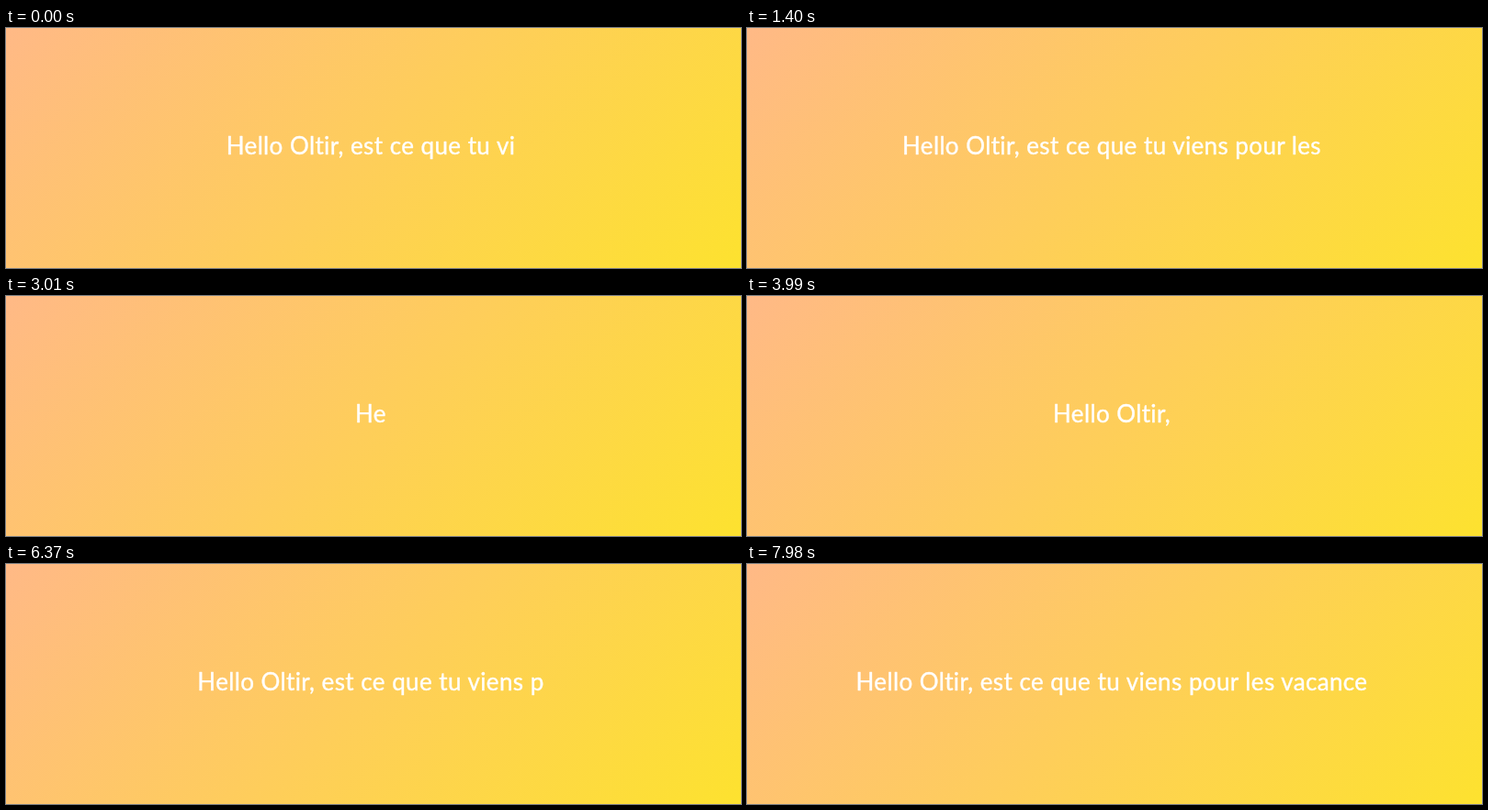
An HTML page that plays this animation: 800 by 262 pixels, repeating every 8000 ms.

```html
<!DOCTYPE html>
<html lang="fr">
<head>
<meta charset="utf-8">
<title>Typing greeting</title>
<style>
  html, body { margin: 0; width: 100%; height: 100%; overflow: hidden; }
  body { background: linear-gradient(135deg, #ffb986, #fde22f); }
  svg { display: block; width: 100%; height: 100%; }
  text {
    font: 26px Lato, "Open Sans", sans-serif;
    letter-spacing: .35px;
    word-spacing: .3px;
    text-anchor: middle;
    fill: #fff;
    stroke: #fff;
    stroke-width: .4px;
    stroke-linejoin: round;
  }
</style>
</head>
<body>
<svg viewBox="0 0 800 262"><text id="line" x="397" y="138"></text></svg>
<script>
  const LOOP = 8000;
  const STEP = 70;         // display interval
  const RESTART = 2730;    // moment the line is cleared
  const CYCLE = 5810;      // one full typing pass
  const KEY = 105.6;       // time per character
  const LEAD = 20;
  const sentence = "Hello Oltir, est ce que tu viens pour les vacances ?";
  const line = document.getElementById("line");

  function draw(ms) {
    const t = Math.floor((ms % LOOP) / STEP) * STEP;
    const typed = (t - RESTART + CYCLE) % CYCLE;
    const count = Math.floor((typed + LEAD) / KEY);
    const text = sentence.slice(0, count).trimEnd();
    if (line.textContent !== text) line.textContent = text;
  }

  const start = performance.now();
  function tick() {
    draw(performance.now() - start);
    requestAnimationFrame(tick);
  }
  tick();
</script>
</body>
</html>
```
